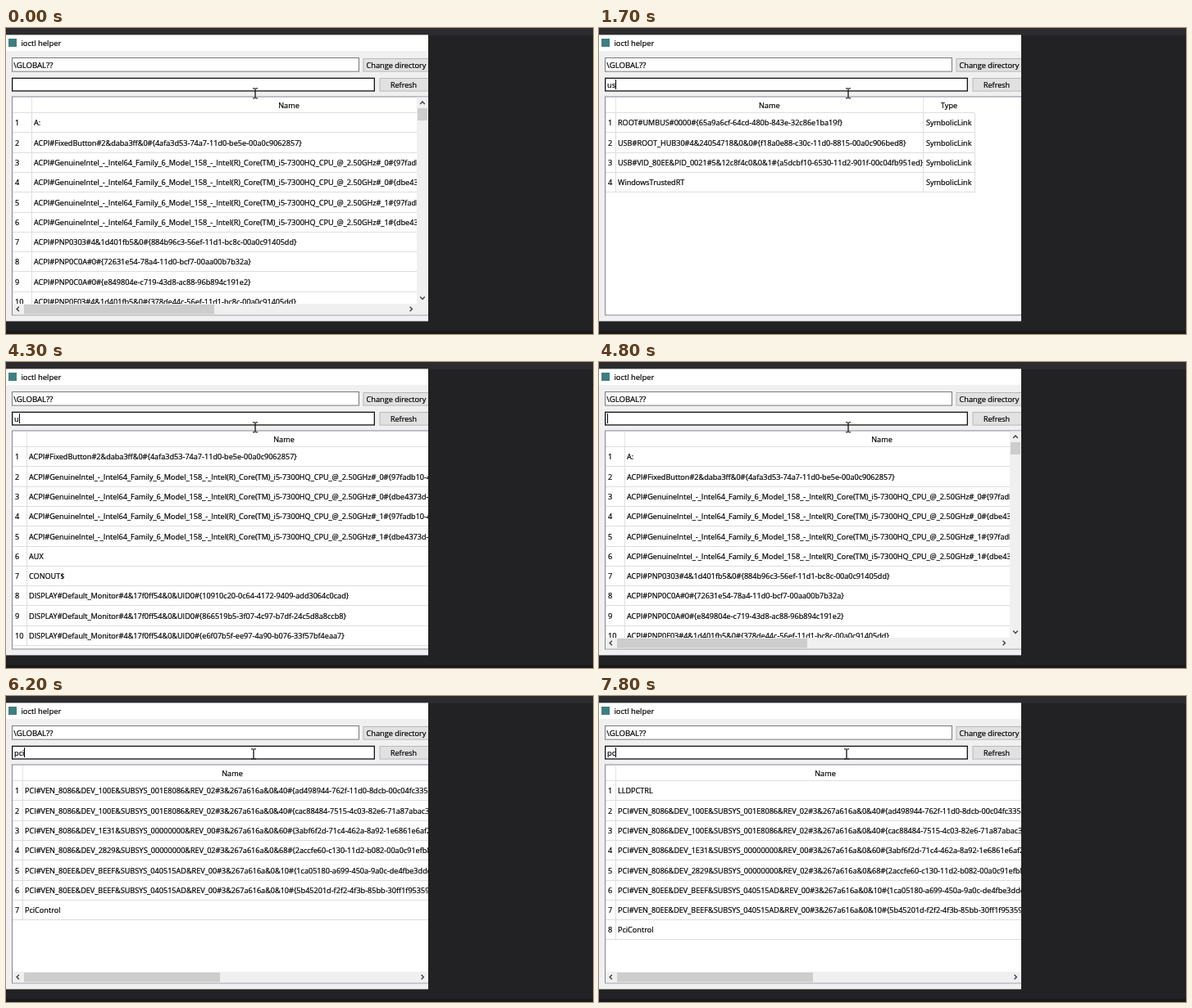
An HTML page with a canvas for the animation above (8 s loop, 716 by 374 pixels).

```html
<!DOCTYPE html>
<html lang="en">
<head>
<meta charset="utf-8">
<title>ioctl helper</title>
<style>
html, body { margin: 0; width: 100%; height: 100%; overflow: hidden; background: #222225; }
canvas { display: block; }
</style>
</head>
<body>
<canvas id="stage" width="716" height="374"></canvas>
<script>
const ctx = document.getElementById('stage').getContext('2d');
const LOOP = 8000, ROW_TOP = 104, PITCH = 24.3, EDGE = 515;

const button = 'ACPI#FixedButton#2&daba3ff&0#{4afa3d53-74a7-11d0-be5e-00a0c9062857}';
const cpus = [0, 1].flatMap(n =>
  ['97fadb10-4e33-40ae-359c-8bef029dbdd0', 'dbe4373d-3c81-40cb-ace4-e0e5d05f0c9f'].map(guid =>
    `ACPI#GenuineIntel_-_Intel64_Family_6_Model_158_-_Intel(R)_Core(TM)_i5-7300HQ_CPU_@_2.50GHz#_${n}#{${guid}}`));
const pnp = [
  'ACPI#PNP0303#4&1d401fb5&0#{884b96c3-56ef-11d1-bc8c-00a0c91405dd}',
  'ACPI#PNP0C0A#0#{72631e54-78a4-11d0-bcf7-00aa00b7b32a}',
  'ACPI#PNP0C0A#0#{e849804e-c719-43d8-ac88-96b894c191e2}',
  'ACPI#PNP0F03#4&1d401fb5&0#{378de44c-56ef-11d1-bc8c-00a0c91405dd}'
];
const monitors = [
  '10910c20-0c64-4172-9409-add3064c0cad',
  '866519b5-3f07-4c97-b7df-24c5d8a8ccb8',
  'e6f07b5f-ee97-4a90-b076-33f57bf4eaa7'
].map(guid => `DISPLAY#Default_Monitor#4&17f0ff54&0&UID0#{${guid}}`);
const usb = [
  'USB#ROOT_HUB30#4&24054718&0&0#{f18a0e88-c30c-11d0-8815-00a0c906bed8}',
  'USB#VID_80EE&PID_0021#5&12c8f4c0&0&1#{a5dcbf10-6530-11d2-901f-00c04fb951ed}'
];
const pci = [
  ...[
    ['100E&SUBSYS_001E8086&REV_02', '40', 'ad498944-762f-11d0-8dcb-00c04fc3358c'],
    ['100E&SUBSYS_001E8086&REV_02', '40', 'cac88484-7515-4c03-82e6-71a87abac361'],
    ['1E31&SUBSYS_00000000&REV_00', '60', '3abf6f2d-71c4-462a-8a92-1e6861e6af27'],
    ['2829&SUBSYS_00000000&REV_02', '68', '2accfe60-c130-11d2-b082-00a0c91efb8b'],
    ['BEEF&SUBSYS_040515AD&REV_00', '10', '1ca05180-a699-450a-9a0c-de4fbe3ddd89'],
    ['BEEF&SUBSYS_040515AD&REV_00', '10', '5b45201d-f2f2-4f3b-85bb-30ff1f953599']
  ].map(([dev, slot, guid]) =>
    `PCI#VEN_${dev.startsWith('BEEF') ? '80EE' : '8086'}&DEV_${dev}#3&267a616a&0&${slot}#{${guid}}`),
  'PciControl'
];

// left/right bound the name column; thumbV and thumbH are scrollbar thumb ends
const wide = { left: 25, right: 653, thumbH: 254 };
const narrow = { left: 20, right: 395.5, types: true };
const medium = { left: 20, right: 532, thumbH: 261 };
const views = {
  '': { ...wide, left: 31, right: 659, thumbV: 113, rows: ['A:', button, ...cpus, ...pnp] },
  u: { ...wide, thumbV: 129, rows: [button, ...cpus, 'AUX', 'CONOUT$', ...monitors] },
  us: { ...narrow, rows: ['ROOT#UMBUS#0000#{65a9a6cf-64cd-480b-843e-32c86e1ba19f}', ...usb, 'WindowsTrustedRT'] },
  usb: { ...narrow, rows: usb },
  p: { ...wide, thumbV: 131, rows: [button, ...cpus, ...pnp, 'ACPI_ROOT_OBJECT'] },
  pc: { ...medium, rows: ['LLDPCTRL', ...pci] },
  pci: { ...medium, rows: pci }
};

const typing = [[0, ''], [1200, 'u'], [1700, 'us'], [2200, 'usb'], [3900, 'us'], [4300, 'u'],
  [4700, ''], [5400, 'p'], [5700, 'pc'], [6200, 'pci'], [7700, 'pc']];
const caretHidden = [[0, 200], [700, 1200], [2800, 3400], [5200, 5400], [6800, 7400]];
const within = (t, [from, to]) => t >= from && t < to;

function rect(x, y, w, h, color) {
  ctx.fillStyle = color;
  ctx.fillRect(x, y, w, h);
}

function box(x, y, w, h, fill, border, line = 1) {
  rect(x, y, w, h, border);
  rect(x + line, y + line, w - 2 * line, h - 2 * line, fill);
}

// A hairline stroke gives the text its slightly heavy weight.
function text(str, x, y, size = 9.1, align = 'left') {
  ctx.font = `${size}px "Open Sans", "Noto Sans", sans-serif`;
  ctx.textAlign = align;
  ctx.fillStyle = ctx.strokeStyle = '#000';
  ctx.lineWidth = 0.22;
  ctx.fillText(str, x, y);
  ctx.strokeText(str, x, y);
}

function clip(x, y, w, h, draw) {
  ctx.save();
  ctx.beginPath();
  ctx.rect(x, y, w, h);
  ctx.clip();
  draw();
  ctx.restore();
}

function chevron(x, y, angle) {
  ctx.save();
  ctx.translate(x, y);
  ctx.rotate(angle);
  ctx.beginPath();
  ctx.moveTo(-2.8, 1.4);
  ctx.lineTo(0, -1.4);
  ctx.lineTo(2.8, 1.4);
  ctx.strokeStyle = '#404040';
  ctx.lineWidth = 1.4;
  ctx.stroke();
  ctx.restore();
}

function drawFrame() {
  rect(0, 0, 716, 374, '#222225');
  rect(0, 0, 716, 9, '#2c2c2e');
  rect(0, 370, 716, 4, '#1a1a1c');
  rect(0, 8.6, EDGE, 349.8, '#f0f0f0');
  rect(0, 8.6, EDGE, 19.4, '#fff');
  rect(3, 13, 10, 10, '#3f7f80');
  text('ioctl helper', 18.4, 22, 9.4);
  box(7, 36, 424, 17.6, '#fff', '#7a7a7a');
  text('\\GLOBAL??', 9.2, 48.8, 9.6);
  box(435.5, 37, 82, 16.6, '#e1e1e1', '#b8b8b8');
  text('Change directory', 476, 48.8, 9.2, 'center');
  box(455.5, 61, 62, 16.6, '#e1e1e1', '#b8b8b8');
  text('Refresh', 485, 73.1, 9, 'center');
}

function drawFilter(filter, t) {
  box(7, 60.7, 443, 16.9, '#fff', '#111', 1.3);
  text(filter, 10, 73, 9.2);
  if (caretHidden.some(span => within(t, span))) return;
  rect(Math.round(10 + ctx.measureText(filter).width), 63, 1, 12, '#000');
}

function drawTable(view, bars) {
  const { left, right, rows, types } = view;
  const viewRight = bars && view.thumbV ? 501 : EDGE;
  const viewBottom = bars && view.thumbH ? 337 : 350.4;
  const tableRight = types ? 458.5 : right;
  const grid = '#dedede';

  box(7, 83.5, 520, 267.9, '#fff', '#828790');
  clip(8, 85, viewRight - 8, viewBottom - 85, () => {
    rect(left, 85, 1, 19, '#e5e5e5');
    rect(8, 103, tableRight - 8, 1, grid);
    text('Name', (left + right) / 2, 98.2, 9.1, 'center');
    if (types) {
      text('Type', 427, 98.2, 9.1, 'center');
      rect(395, 85, 1, 19, '#e5e5e5');
    }
    rows.forEach((name, i) => {
      const top = ROW_TOP + i * PITCH;
      const base = top + 15.3;
      text(i + 1, 11, base);
      text(name, left + 3, base);
      rect(8, Math.round(top + PITCH - 1), tableRight - 8, 1, grid);
      rect(left, top, 1, PITCH, grid);
      if (types) {
        text('SymbolicLink', 399, base);
        rect(395, top, 1, PITCH, grid);
        rect(458, top, 1, PITCH, grid);
      }
    });
  });

  if (!bars) return;
  if (view.thumbH) {
    rect(8, 337, EDGE - 8, 13.4, '#f0f0f0');
    rect(22, 338, view.thumbH - 22, 11.6, '#cdcdcd');
    chevron(14.5, 343.5, -Math.PI / 2);
    chevron(viewRight - 7, 343.5, Math.PI / 2);
  }
  if (view.thumbV) {
    rect(501, 84.5, EDGE - 501, 252.5, '#f0f0f0');
    rect(502, 98, 12, view.thumbV - 98, '#cdcdcd');
    chevron(508, 91.5, 0);
    chevron(508, 330, Math.PI);
  }
}

function drawPointer(t) {
  const p = Math.min(1, Math.max(0, (t - 4900) / 400));
  const x = 304 - 2 * p, y = 79.8 - 9 * p;
  rect(x - 0.65, y - 6, 1.3, 12, '#111');
  for (const dy of [-6.5, 5.5]) {
    rect(x - 3, y + dy, 2.5, 1.1, '#111');
    rect(x + 0.5, y + dy, 2.5, 1.1, '#111');
  }
}

function render(now) {
  const t = Math.floor(now % LOOP / 100) * 100;
  const filter = typing.findLast(([start]) => t >= start)[1];
  ctx.clearRect(0, 0, 716, 374);
  drawFrame();
  drawFilter(filter, t);
  // scrollbars return one step after the long list does
  drawTable(views[filter], !within(t, [4300, 4400]));
  rect(EDGE, 9, 716 - EDGE, 361, '#222225');
  drawPointer(t);
  requestAnimationFrame(render);
}
requestAnimationFrame(render);
</script>
</body>
</html>
```
